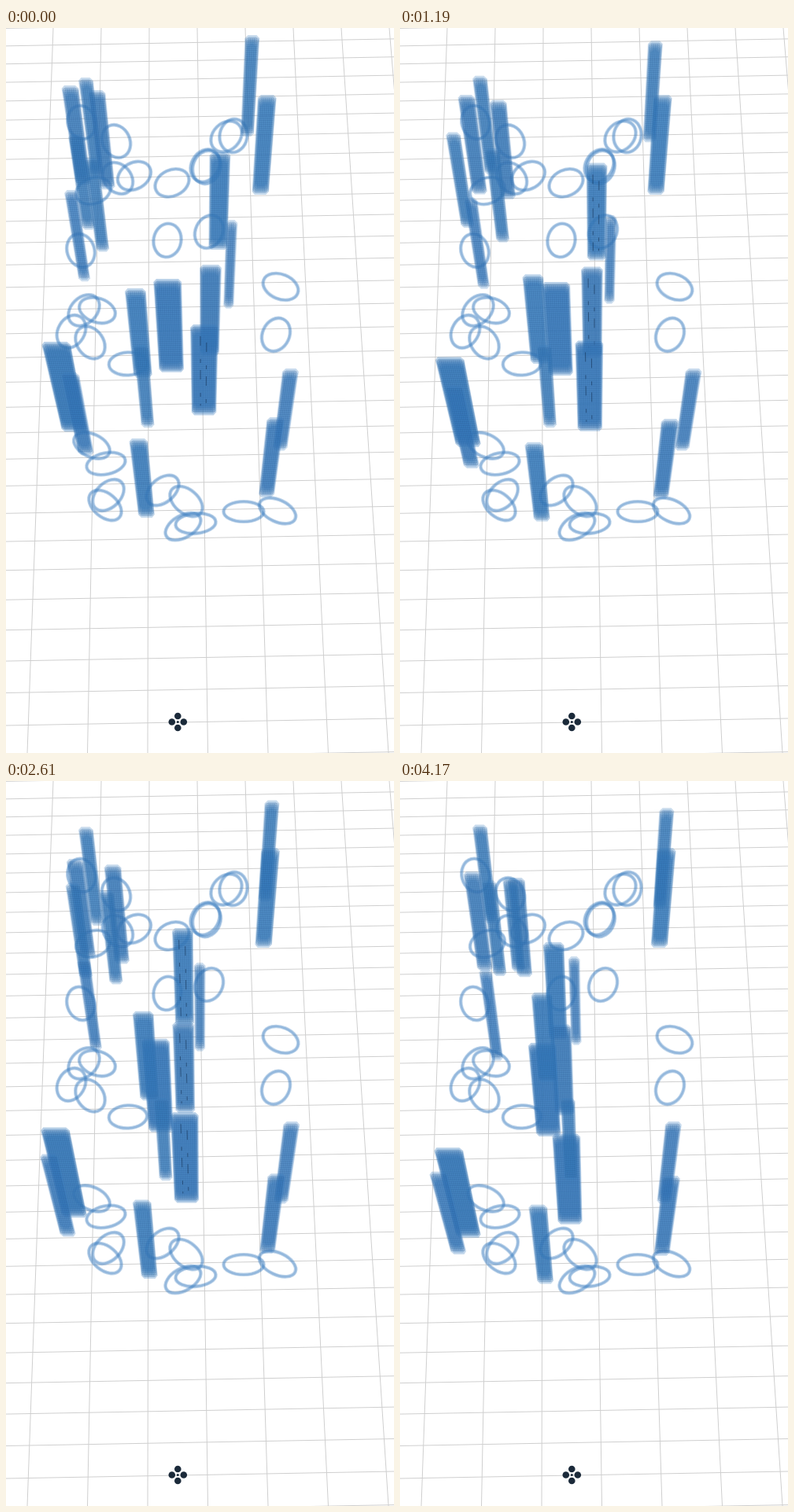
An HTML page with a canvas for the animation above (4.27 s loop, 493 by 922 pixels).

```html
<!DOCTYPE html>
<html>
<head>
<meta charset="utf-8">
<style>
html, body { margin: 0; height: 100%; overflow: hidden; background: #fff; }
canvas { display: block; }
</style>
</head>
<body>
<canvas id="stage" width="493" height="922"></canvas>
<script>
const ctx = document.getElementById('stage').getContext('2d');
const WIDTH = 493, HEIGHT = 922;
const LOOP = 4270, STEP = 198;         // the scene advances in discrete steps
const NADIR = { x: 248, y: 1270 };     // where the pillars converge

// top x, top y, x and y per step, width
const PILLARS = [
  [313, 9, 1.94, 1.2, 19], [332, 85, .33, 0, 24],
  [272, 158, -3.67, 2.24, 27], [287, 244, -3.14, -1, 15],
  [260, 301, -2.68, .4, 28], [252, 377, -1.95, 3.4, 36],
  [205, 319, -1.17, .67, 36], [164, 331, .76, -2.95, 27],
  [171, 403, 2, 0, 19], [168, 522, .33, .8, 24],
  [362, 433, 1.93, 0, 21], [343, 495, .1, .33, 23],
  [63, 399, -.1, 3.2, 37], [81, 438, -2.1, 2.8, 23],
  [101, 63, 0, -.36, 19], [81, 73, .48, 2, 22],
  [115, 79, 1.55, 2.1, 22], [108, 165, 1.5, -2, 19],
  [88, 135, -3.5, -.4, 19], [82, 206, 1.25, 1.6, 17],
];

// centre x, centre y, turn of the long axis in degrees
const RINGS = [
  [140, 144, 65], [163, 188, -30], [142, 191, 50], [111, 207, -20], [96, 120, 75],
  [95, 283, 72], [211, 197, -25], [205, 270, 100], [258, 259, 115], [280, 138, -45],
  [289, 137, 100], [253, 175, 120], [255, 177, -70], [349, 329, 22], [343, 390, 115],
  [99, 359, -45], [116, 359, 18], [83, 386, -60], [107, 400, 55], [155, 427, -3],
  [109, 531, 25], [127, 554, -12], [130, 594, -45], [126, 607, 40], [199, 588, -40],
  [229, 602, 40], [225, 634, -30], [241, 630, -5], [302, 615, 0], [345, 614, 25],
];

function line(x1, y1, x2, y2) {
  ctx.beginPath();
  ctx.moveTo(x1, y1);
  ctx.lineTo(x2, y2);
  ctx.stroke();
}

function drawGrid() {
  ctx.strokeStyle = '#cfcfcf';
  ctx.lineWidth = 1;
  for (let n = -3; n < 6; n++) line(182 + n * 61, 0, 180 + n * 76.5, HEIGHT);
  for (let n = -1; n < 32; n++) {
    const y = 1 / (1 / 3257 + n * 3.96e-6) - 2370;
    line(0, y, WIDTH, y - 9);
  }
}

// rings look flatter the lower they are and the more level they lie
function drawRing([x, y, degrees]) {
  const turn = degrees * Math.PI / 180;
  const squash = .82 - .32 * y / 620 * Math.cos(turn) ** 2;
  const radius = 32 - 13 * squash;
  ctx.beginPath();
  ctx.ellipse(x, y, radius, radius * squash, turn, 0, 7);
  ctx.strokeStyle = 'rgba(66,130,194,.34)';
  for (const width of [4.6, 2.6]) {
    ctx.lineWidth = width;
    ctx.stroke();
  }
}

// keeps a pillar between the two slanted side walls
function bounce(x, y) {
  const left = 71 - .0576 * y, right = 344 + .072 * y;
  return right - Math.abs(right - left - Math.abs(x - left));
}

function drawPillar([x0, y0, dx, dy, width], tick) {
  const y = y0 + dy * tick;
  const x = bounce(x0 + dx * tick, y);
  const length = 120 - .06 * y0 + .5 * width;
  const half = width / 2;
  const at = (u, v) => {
    const k = v / (NADIR.y - y);
    return [x + u + (NADIR.x - x - u) * k, y + v];
  };

  // nested shells give the soft rim
  ctx.fillStyle = `rgba(58,124,188,${.17 + .005 * width})`;
  for (let i = 0; i < 6; i++) {
    const w = half - i * .8, top = i * 2.2, end = length - top;
    ctx.beginPath();
    for (const [v, inset] of [[top, 4], [top + 4, 0], [end - 4, 0], [end, 4]]) ctx.lineTo(...at(w - inset, v));
    for (const [v, inset] of [[end, 4], [end - 4, 0], [top + 4, 0], [top, 4]]) ctx.lineTo(...at(inset - w, v));
    ctx.fill();
  }

  // woven texture
  ctx.lineWidth = .8;
  ctx.strokeStyle = 'rgba(30,72,124,.2)';
  for (let u = 2 - half; u < half - 1; u += 2.6) line(...at(u, 4), ...at(u, length - 4));
  for (let v = 4; v < length - 3; v += 2.6) line(...at(2 - half, v), ...at(half - 2, v));

  // near-vertical strands line up into dark streaks
  if (width > 25 && Math.abs(x - 235) < 20) {
    ctx.strokeStyle = 'rgba(10,30,60,.6)';
    ctx.setLineDash([12, 17, 5, 9]);
    for (const u of [-5, 3]) line(...at(u, 20 + u), ...at(u, length - 12));
    ctx.setLineDash([]);
  }
}

function drawMarker(x, y) {
  const dot = (dx, dy, r) => {
    ctx.beginPath();
    ctx.arc(x + dx, y + dy, r, 0, 7);
    ctx.fill();
  };
  ctx.fillStyle = '#1b2a3a';
  dot(0, 0, 1.5);
  for (const side of [-7.5, 7.5]) {
    dot(side, 0, 4.3);
    dot(0, side, 4.3);
  }
}

function draw() {
  const tick = Math.floor(performance.now() % LOOP / STEP);
  ctx.clearRect(0, 0, WIDTH, HEIGHT);
  drawGrid();
  RINGS.forEach(drawRing);
  PILLARS.forEach(pillar => drawPillar(pillar, tick));
  drawMarker(218.3, 882.5);
  requestAnimationFrame(draw);
}
draw();
</script>
</body>
</html>
```
